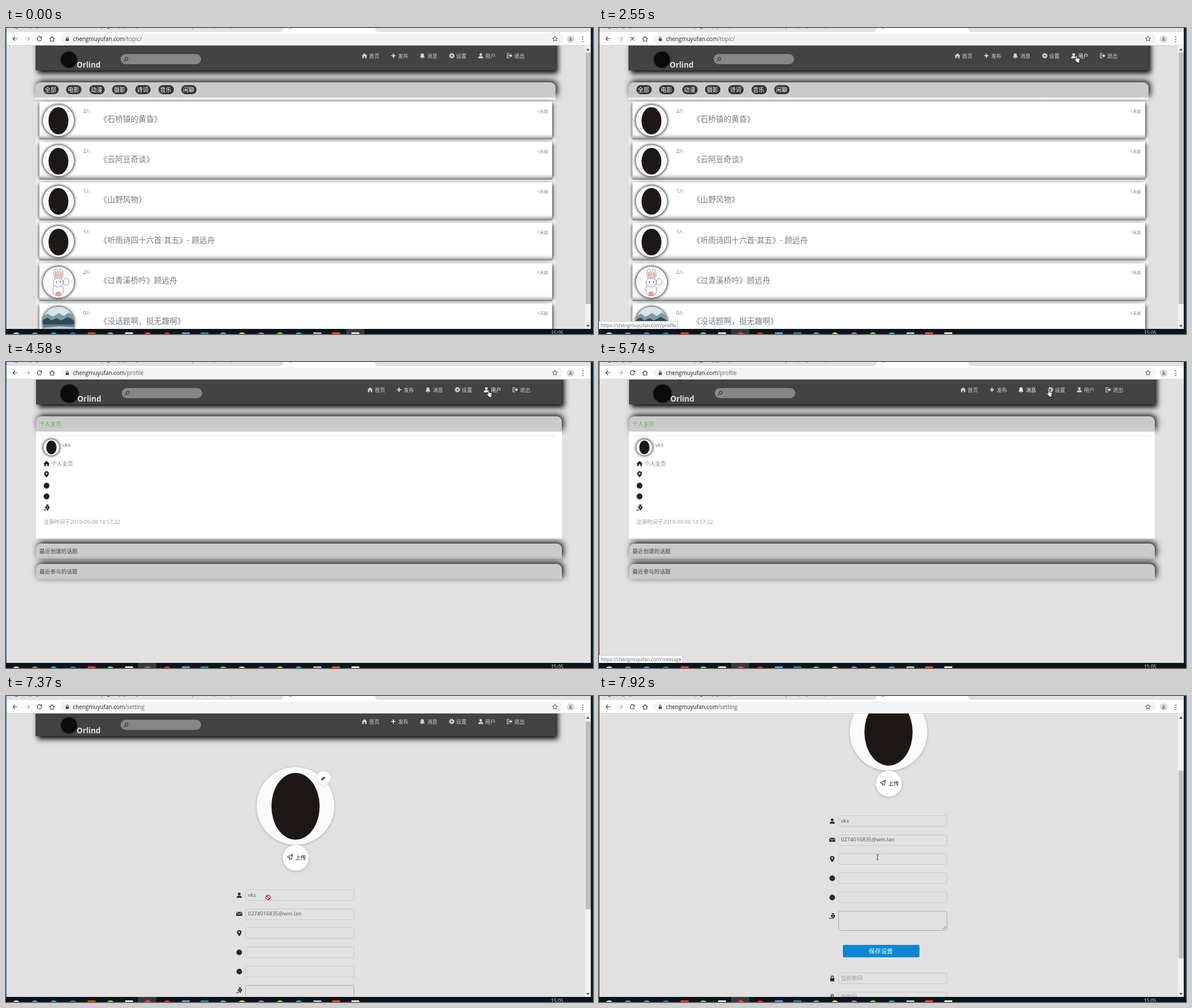
An HTML page that plays this animation: 1035 px wide and 541 px high, repeating every 8000 ms.

```html
<!DOCTYPE html>
<html lang="zh-CN">
<head>
<meta charset="utf-8">
<title>Orlind</title>
<style>
html, body { margin: 0; width: 100%; height: 100%; overflow: hidden; background: #0c151b; }
body { position: relative; font-family: "Open Sans", "Noto Sans CJK SC", "Noto Sans CJK", sans-serif; }
div, svg { position: absolute; }
svg { overflow: visible; fill: currentColor; }
#stage { left: 0; top: 0; width: 1035px; height: 541px; overflow: hidden; }
.text { line-height: 20px; margin-top: -10px; white-space: pre; }
.page { inset: 0; background: #e1e1e1; clip-path: inset(31px 4px 9px 1px); }
.nav { background: #434343; box-shadow: 4px 5px 9px #000; }
.band { background: #cacaca; border-radius: 9px 9px 0 0; box-shadow: 3px -3px 11px #111; }
.card { background: #fff; box-shadow: inset 0 -10px 9px -8px rgba(0,0,0,.75), 5px 0 6px -3px rgba(0,0,0,.75), -5px 0 6px -3px rgba(0,0,0,.5); }
.face { border-radius: 50%; background: #fafafa; box-shadow: 0 0 5px 1px #222; overflow: hidden; }
.tag { background: #333; border-radius: 8px; }
.field { box-sizing: border-box; border: 1px solid #c8c8c8; border-radius: 3px; }
.bubble { left: 0; top: 518px; height: 14px; padding: 0 2px 0 3px; background: #fff; border: solid #c4c6c9; border-width: 1px 1px 0 0;
  border-radius: 0 3px 0 0; font-size: 8.3px; line-height: 14px; color: #5f6368; white-space: pre; }
</style>
</head>
<body>
<div id="stage"></div>
<script>
const SITE = 'chengmuyufan.com', USER = 'vks', MAIL = '0274016835@wm.lan';
let css = '';

// frames: [ms, declarations, easing]
const key = (name, frames) => {
  css += `@keyframes ${name}{` + frames.map(([t, d, ease]) =>
    `${t / 80}%{${d}${ease ? ';animation-timing-function:' + ease : ''}}`).join('') + '}';
};
const flip = (name, on, off, times) =>
  key(name, [[0, off], ...times.map((t, i) => [t, i % 2 ? off : on])]);
const show = (name, ...times) => flip(name, 'opacity:1', 'opacity:0', times);
const hot = (name, ...times) => flip(name, 'color:#fff', 'color:#d2d2d2', times);
const run = (name, ease = 'step-end') => name ? `animation:${name} 8s ${ease} infinite;` : '';

const box = (x, y, w, h, style = '', inner = '', cls = '') =>
  `<div class="${cls}" style="left:${x}px;top:${y}px;width:${w}px;height:${h}px;${style}">${inner}</div>`;
const text = (x, cy, size, str, style = '') =>
  `<div class="text" style="left:${x}px;top:${cy}px;font-size:${size}px;${style}">${str}</div>`;
const svg = (x, y, w, h, vb, inner, style = '') =>
  `<svg viewBox="${vb}" style="left:${x}px;top:${y}px;width:${w}px;height:${h}px;${style}">${inner}</svg>`;
const line = (d, w = 1.6) => `<path d="${d}" fill="none" stroke="currentColor" stroke-width="${w}"/>`;

const icons = {
  home: '<path d="M8 1 0 8.5h2V15h4v-5h4v5h4V8.5h2z"/>',
  plus: '<path d="M6.3 2h3.4v4.3H14v3.4H9.7V14H6.3V9.7H2V6.3h4.3z"/>',
  bell: '<path d="M8 1C5 1 3.5 3 3.5 6v3l-2 3v1h13v-1l-2-3V6C12.5 3 11 1 8 1zM6 14h4a2 2 0 0 1-4 0z"/>',
  gear: '<g fill="none" stroke="currentColor"><circle cx="8" cy="8" r="4.2" stroke-width="3.6"/><circle cx="8" cy="8" r="6.7" stroke-width="2.6" stroke-dasharray="2.63 2.63"/></g>',
  user: '<circle cx="8" cy="4.6" r="3.8"/><path d="M1 15c0-5 3-6 7-6s7 1 7 6z"/>',
  exit: line('M7 2H1.5v12H7', 2) + '<path d="M5 6h5V2.5L16 8l-6 5.500V10H5z"/>',
  mail: '<path d="M0 2.500h16L8 8.500zM0 4.300V13.500h16V4.300L8 10.400z"/>',
  pin: '<path fill-rule="evenodd" d="M8 0a6 6 0 0 0-6 6c0 4 6 10 6 10s6-6 6-10a6 6 0 0 0-6-6zm0 3.500a2.300 2.300 0 1 1 0 4.600 2.300 2.300 0 0 1 0-4.600z"/>',
  dot: '<circle cx="8" cy="8" r="7.500"/>',
  pen: '<path fill-rule="evenodd" d="M7 0h6v3H7zM6 4h8l2 4-4 5v2H9v-2L4 8zm4 3a1.500 1.500 0 1 0 .1 0zM0 13h7v2H0z"/>',
  lock: '<path d="M2.500 7h11v9h-11z"/>' + line('M5 7V4.500a3 3 0 0 1 6 0V7', 2),
  pencil: '<path d="m1 15 1-5 8-8 4 4-8 8z"/>',
  plane: line('M1 8 15 1l-3 13-5-4zM15 1 7 10v5l2.500-3', 1.3),
  find: line('M10 1.500a4.500 4.500 0 1 1-.1 0zM6.500 9.500 1 15', 2),
  back: line('M15 8H2M8 2 2 8l6 6', 1.9),
  next: line('M1 8h13M8 2l6 6-6 6', 1.9),
  reload: line('M13.500 5A6.200 6.200 0 1 0 14.200 9', 1.9) + '<path d="M15 1v6H9z"/>',
  stop: line('M2.500 2.500l11 11m0-11-11 11', 1.9),
  house: line('M1 8.500 8 2l7 6.500M3.500 7v7h9V7', 1.9),
  star: line('m8 1 2.100 4.700 5 .5-3.800 3.400 1.100 5L8 12l-4.400 2.600 1.100-5L.9 6.200l5-.5z', 1.5)
};
const icon = (name, cx, cy, s = 10, style = '') =>
  svg(cx - s / 2, cy - s / 2, s, s, '0 0 16 16', icons[name], style);

/* timing */
show('topicOn', 0, 2650);
show('profileOn', 2650, 6560);
show('settingOn', 6560);
show('stopOn', 2390, 2730, 6430, 6620);
show('goOn', 0, 2390, 2730, 6430, 6620);
show('recOn', 0, 2390);
show('webOn', 2390);
hot('topicUser', 1620, 2650);
hot('proUser', 4430, 4650);
hot('proSet', 4720, 4960, 5810, 6560);
hot('proMsg', 5050, 5810);
hot('setSet', 0, 6760);
show('arrowOn', 370, 1620, 6740, 7080, 7450, 7600, 7760, 7860);
show('handOn', 1620, 6740);
show('noOn', 7080, 7450, 7600, 7760);
show('beamOn', 7860);
const fade = (name, pairs) => key(name, pairs.map(([t, o]) => [t, 'opacity:' + o]));
fade('tipProfile', [[0, 0], [1850, 0], [2010, 1], [2870, 1], [3040, 0], [8000, 0]]);
fade('tipMessage', [[0, 0], [5340, 0], [5510, 1], [5809, 1], [5810, 0], [8000, 0]]);
fade('tipSetting', [[0, 0], [5809, 0], [5810, 1], [6800, 1], [6960, 0], [8000, 0]]);
const slide = (name, a, b) => key(name, [[0, 'transform:none', 'step-end'],
  [7370, `transform:translateY(${a}px)`, 'steps(7,end)'],
  [7920, `transform:translateY(${b}px)`], [8000, `transform:translateY(${b}px)`]]);
slide('scroll', -4, -135);
slide('thumb', 2, 89);
key('move', [
  [0, 926, 560], [370, 926, 530, 10], [1150, 768, 96], [1230, 778, 89, 10], [2010, 841, 48],
  [4430, 843, 48, 2], [4580, 850, 49, 8], [5200, 757, 49], [5350, 760, 49, 2], [5510, 774, 49],
  [5740, 792, 48], [5810, 811, 48], [5970, 813, 48], [6120, 807, 43], [6500, 807, 51],
  [6740, 780, 75, 5], [7140, 462, 356], [7370, 462, 356, 7], [7920, 491, 285], [8000, 491, 285]
].map(([t, x, y, n]) => [t, `transform:translate(${x}px,${y}px)`, n ? `steps(${n},end)` : 'step-end']));

/* shared parts */
const links = [['home', '首页'], ['plus', '发布'], ['bell', '消息'], ['gear', '设置'], ['user', '用户'], ['exit', '退出']];
const nav = (x, w, dx, logo, hover = {}) => {
  const s = dx ? 2 : 0;
  return box(x, 20, w, 55, '', '', 'nav')
    + box(logo.x - logo.r, logo.y - logo.r, logo.r * 2, logo.r * 2, 'border-radius:50%;background:#0b0b0b;box-shadow:0 0 3px #111')
    + text(124.500 + s * .6, 64.500, 13.400, 'Orlind', 'font-weight:700;color:#e2e2e2')
    + box(202 + s, 46, 142, 18, 'border-radius:9px;background:#868686')
    + icon('find', 211 + s, 55, 9, 'color:#333')
    + links.map(([i, label], n) => {
      const lx = 627 + dx + n * 51.200;
      return `<div style="left:0;top:0;color:#d2d2d2;${run(hover[i])}">`
        + icon(i, lx + 5, 48.500, 10) + text(lx + 13, 49.500, 9.200, label) + '</div>';
    }).join('');
};
// plain stand-in for the portrait
const face = (cx, cy, r, style = '') => box(cx - r, cy - r, r * 2, r * 2, style,
  box(r * .38, r * .16, r * 1.240, r * 1.720, 'border-radius:50%;background:#1d1816'), 'face');
const bar = (h, anim = '') => box(1021, 31, 10, 501, 'background:#f1f1f1')
  + box(1021.500, 43, 9, h, 'background:#bfbfbf;' + anim)
  + svg(1023, 36, 6, 4, '0 0 6 4', '<path d="M0 4 3 0l3 4z"/>', 'color:#555')
  + svg(1023, 525, 6, 4, '0 0 6 4', '<path d="M0 0h6L3 4z"/>', 'color:#555');
const page = (anim, inner) => `<div class="page" style="${run(anim)}">${inner}</div>`;

/* topic list */
const rabbit = svg(0, 0, 55, 55, '0 0 55 55',
  `<g fill="#fff" stroke="#777" stroke-width=".8"><ellipse cx="23" cy="13" rx="3.500" ry="9"/><ellipse cx="32" cy="13" rx="3.500" ry="9"/>
  <ellipse cx="27" cy="41" rx="9.500" ry="11"/><ellipse cx="27" cy="28" rx="9" ry="8"/><ellipse cx="41" cy="27" rx="5" ry="6"/></g>
  <g fill="#e2a184"><ellipse cx="23" cy="14" rx="1.500" ry="6"/><ellipse cx="32" cy="14" rx="1.500" ry="6"/><ellipse cx="27" cy="48" rx="5" ry="4"/></g>
  <circle cx="24" cy="27" r="1" fill="#222"/><circle cx="31" cy="27" r="1" fill="#222"/>`);
const lake = svg(0, 0, 55, 55, '0 0 55 55',
  `<rect width="55" height="55" fill="#b5cbd2"/><rect width="55" height="16" fill="#d8e4e8"/>
  <path d="M0 17l9-5 8 6 11-7 9 5 9-6 9 6v13H0z" fill="#7d9aa5"/><path d="M0 23l8-4 7 5 9-4 8 4 12-6 11 6v7H0z" fill="#2d4a55"/>
  <path d="M0 31h55v5L30 34 0 37z" fill="#5c7c86"/>`);
const rows = [
  ['2', '5', '《石桥镇的黄昏》'], ['2', '4', '《云阿豆奇谈》'], ['1', '3', '《山野风物》'],
  ['1', '2', '《听雨诗四十六首·其五》- 顾远舟'], ['2', '4', '《过青溪桥吟》顾远舟', rabbit],
  ['0', '0', '《没话题啊，挺无趣啊》', lake]
];
const row = ([a, b, title, art], i) => {
  const y = 130 + i * 71.400;
  return box(59, y, 904, 67, '', '', 'card')
    + (art ? box(65, y + 6, 55, 55, '', art, 'face') : face(92.500, y + 33.500, 27.500))
    + text(136, y + 16.500, 9.600, `${a}/<span style="font-size:7px;color:#aaa">${b}</span>`, 'color:#777')
    + text(165, y + 30.500, 13.700, title, 'color:#737b82')
    + text(937, y + 16.500, 7.300, '1天前', 'color:#777');
};
const tags = ['全部', '电影', '动漫', '摄影', '诗词', '音乐', '闲聊'].map((s, i) => {
  const x = 65.500 + i * 40.600;
  return box(x, 101, 27, 16, '', '', 'tag') + text(x + 3, 109, 10, s, 'color:#fff');
}).join('');
const topic = page('topicOn',
  nav(52, 917, 0, { x: 111, y: 55.500, r: 14 }, { user: 'topicUser' })
  + box(52, 96, 917, 27, '', '', 'band') + tags
  + box(52, 123, 917, 420, 'background:#f1f1f1')
  + box(52, 123, 917, 7, 'background:linear-gradient(#fff,#c4c4c4)')
  + rows.map(row).join('') + bar(445));

/* profile */
const strip = (y, label, color) => box(53, y, 927, 27, '', '', 'band') + text(59, y + 13.500, 9.600, label, `color:${color}`);
const profile = page('profileOn',
  nav(53, 927, 10, { x: 112, y: 56, r: 16 }, { user: 'proUser', gear: 'proSet', bell: 'proMsg' })
  + strip(96, '个人主页', '#3fc234') + strip(321, '最近创建的话题', '#444') + strip(357, '最近参与的话题', '#444')
  + box(53, 123, 927, 189, 'background:#fff') + box(59, 130, 914, 1, 'background:#e4e4e4')
  + face(80, 150.500, 14) + text(99.500, 146.500, 9.500, USER, 'color:#6d757c')
  + ['home', 'pin', 'dot', 'dot', 'pen'].map((n, i) => icon(n, 71.500, 179 + i * 19.500, 11, 'color:#222')).join('')
  + text(80, 179.500, 9.500, '个人主页', 'color:#737b82')
  + text(66, 283, 9.400, '注册时间于2019-09-08 14:57:22', 'color:#999'));

/* settings */
const fields = [['user', USER], ['mail', MAIL], ['pin'], ['dot'], ['dot'], ['pen'], ['lock', '当前密码', 634], ['lock', '新密码', 667.700]];
const form = fields.map(([name, value = '', at], i) => {
  const y = at || 356 + i * 33.700, area = name === 'pen';
  return icon(name, 411, y, 10.500, 'color:#2a2a2a')
    + box(421.500, y - 10, 192, area ? 35 : 20, area ? 'border-color:#aaa' : '', '', 'field')
    + text(426.500, y - .5, at ? 9.600 : 9.450, value, at ? 'color:#999' : 'color:#555;font-family:"Liberation Sans",Arial,sans-serif');
}).join('');
const setting = page('settingOn',
  `<div style="inset:0;${run('scroll')}">`
  + nav(52, 917, 0, { x: 111, y: 55.500, r: 14 }, { gear: 'setSet' })
  + face(510.500, 198, 68.500, 'box-shadow:0 1px 4px rgba(0,0,0,.25)')
  + box(547.500, 136.500, 24.500, 24.500, 'border-radius:50%;background:#fff;box-shadow:0 1px 4px rgba(0,0,0,.15)')
  + icon('pencil', 559.500, 149, 9, 'color:#444')
  + box(488, 266.500, 46, 46, 'border-radius:50%;background:#fff;box-shadow:0 1px 4px rgba(0,0,0,.25)')
  + icon('plane', 500, 288.500, 11, 'color:#222') + text(510, 290, 9.600, '上传', 'color:#111')
  + form + svg(606, 541, 6, 6, '0 0 6 6', line('M0 6 6 0M3 6 6 3', .8), 'color:#666')
  + box(430, 575, 135, 22, 'border-radius:2px;background:#0a88d2') + text(475.500, 585.500, 10.700, '保存设置', 'color:#fff')
  + '</div>' + bar(332, run('thumb', 'linear')));

/* browser frame */
const path = (anim, str) => text(118, 19, 9.900, `${SITE}<span style="color:#666">${str}</span>`, 'color:#222;' + run(anim));
const dark = 'color:#4a4d51;';
const frame = box(0, 0, 1031, 31, 'background:#fff;border-bottom:1px solid #d4d6d9;box-sizing:border-box')
  + box(0, 0, 489, 7, 'background:#dee1e6;border-bottom-right-radius:6px;overflow:hidden',
    ['page guide', 'my gallery', 'project help'].map((s, i) => text(30 + i * 161, -4.500, 9, s, 'color:#555')).join(''))
  + box(651, 0, 380, 7, 'background:#dee1e6;border-bottom-left-radius:6px')
  + box(168, 0, 1, 3, 'background:#999') + box(329, 0, 1, 3, 'background:#999')
  + box(15, -6, 7, 7, 'border-radius:50%;background:#333') + box(177, -6, 7, 7, 'border-radius:50%;background:#333')
  + box(498, -6, 7, 7, 'border-radius:50%;background:#888')
  + box(96, 10, 886, 18, 'border-radius:9px;background:#f1f3f4')
  + icon('back', 16, 19, 10, dark) + icon('next', 38, 19, 10, 'color:#b4b6b9')
  + icon('reload', 59, 19, 10, dark + run('goOn')) + icon('stop', 59, 19, 10, dark + run('stopOn'))
  + icon('house', 81, 19, 10.500, dark) + icon('lock', 107.500, 19, 8, dark) + icon('star', 968, 19, 10, dark)
  + box(989, 13, 12.500, 12.500, 'border-radius:50%;background:#d9dbde') + icon('user', 995.200, 19.200, 7, 'color:#85888c')
  + [14.500, 18.500, 22.500].map(y => box(1016, y, 2, 2, 'border-radius:50%;background:#4a4d51')).join('')
  + path('topicOn', '/topic/') + path('profileOn', '/profile') + path('settingOn', '/setting')
  + box(0, 0, 1, 532, 'background:#1f6296') + box(1031, 0, 4, 541, 'background:#11222e');

const tips = ['Profile', 'Message', 'Setting'].map(s =>
  `<div class="bubble" style="${run('tip' + s, 'linear')}">https://${SITE}/${s.toLowerCase()}</div>`).join('');

const tints = ['#ccc', '#7d8a92', '#2d9bdc', '#1c78b4', '#e33a22', '#7cc86a', '#ddd', '#e8502a', '#d8301f', '#4d9fd8',
  '#2f7f86', '#4fb49a', '#e6c25c', '#9a7bb5', '#8fc642', '#27b5b5', '#b5b5b5', '#ee4a25', '#ddd'];
const tasks = box(0, 532, 1035, 9, 'background:#0b141a')
  + box(600, 532, 32, 9, 'background:#343b40;' + run('recOn')) + box(233, 532, 32, 9, 'background:#343b40;' + run('webOn'))
  + tints.map((c, i) => box(11 + i * 33.200, 538, 14, 14, `background:${c};border-radius:${[4, 6, 9, 10, 16, 17, 18].includes(i) ? 1 : 7}px`)).join('')
  + text(961, 539, 8.500, '15:05', 'color:#eee');

const shape = (anim, inner) => `<g style="${run(anim)}">${inner}</g>`;
const pointer = `<div style="left:0;top:0;${run('move', 'linear')}">` + svg(0, 0, 12, 16, '0 0 12 16',
  '<g stroke-linejoin="round">'
  + shape('arrowOn', '<path d="M0 0v12l2.800-2.600 1.900 4.100 1.800-.8-1.800-3.900h3.900z" fill="#fff" stroke="#000" stroke-width=".8"/>')
  + shape('handOn', '<path transform="translate(-3)" d="M3 1.200a1 1 0 0 1 2 0V5l4 .9c.8.2 1 .8.9 1.500L9 11v2.500H4V12L.8 8.200C.2 7.200 1.400 6.400 2.200 7.200L3 8z" fill="#fff" stroke="#000" stroke-width=".8"/>')
  + shape('noOn', '<circle r="3.800" fill="#fff" stroke="#d8121f" stroke-width="1.500"/><path d="m-2.700-2.700 5.400 5.400" stroke="#d8121f" stroke-width="1.500"/>')
  + shape('beamOn', '<path d="M-2-4.500h1.500L0-4l.5-.5H2M0-4v8M-2 4.500h1.500L0 4l.5.5H2" fill="none" stroke="#222" stroke-width=".9"/>')
  + '</g>') + '</div>';

document.head.insertAdjacentHTML('beforeend', `<style>${css}</style>`);
document.getElementById('stage').innerHTML = setting + profile + topic + frame + tips + tasks + pointer;
</script>
</body>
</html>
```
